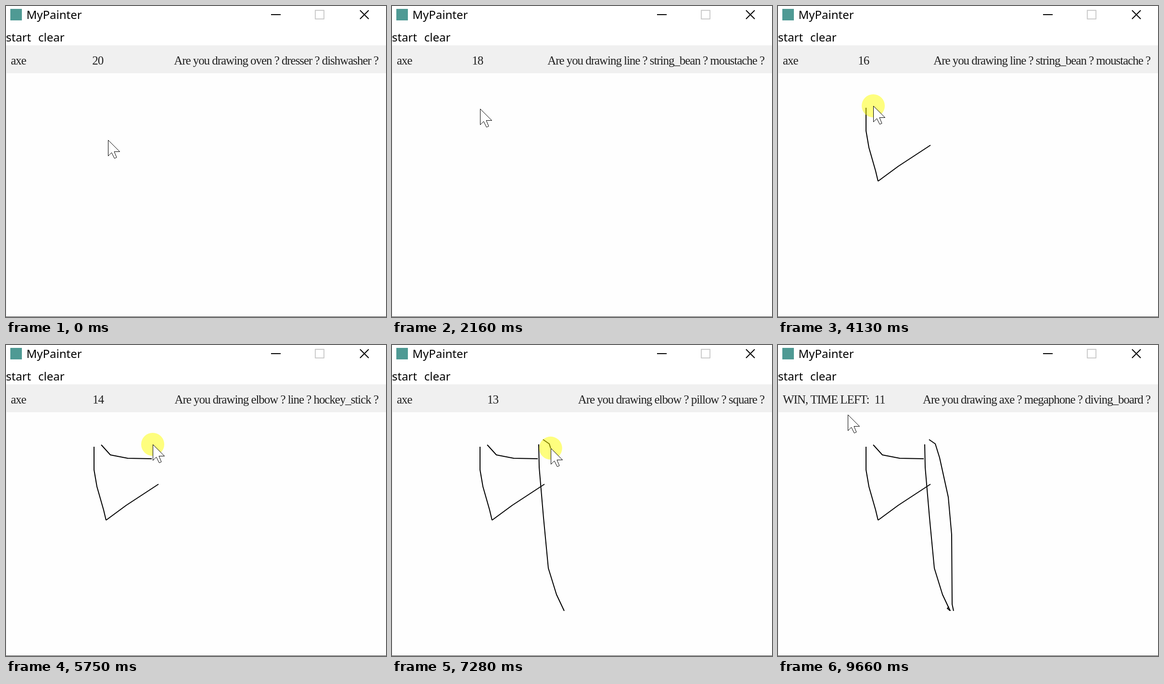
Animation, 790 px wide and 648 px high, one loop 9730 ms. Source, as an HTML page with a canvas:

```html
<!DOCTYPE html>
<html lang="en">
<head>
<meta charset="utf-8">
<title>MyPainter</title>
<style>
  html, body { margin: 0; width: 100%; height: 100%; overflow: hidden; background: #fff; }
  canvas { display: block; }
</style>
</head>
<body>
<canvas id="stage" width="790" height="648"></canvas>
<script>
const ctx = document.getElementById('stage').getContext('2d');
const LOOP = 9730;
const SANS = '24px "Noto Sans", sans-serif';
const SERIF = '25px "Liberation Serif", serif';
const ARROW = new Path2D('M0 0V33L7 26L13 38L17.5 36L12.5 24H24Z');

// Each stroke: button down, button up, and the corners of its line.
const strokes = [
  { press: 2240, release: 2870, points: [[183, 212], [183, 260], [189, 295], [203, 344], [208, 365]] },
  { press: 2940, release: 3650, points: [[208, 365], [250, 334], [317, 290]] },
  { press: 4130, release: 5140, points: [[198, 208], [217, 229], [253, 236], [303, 237]] },
  { press: 5750, release: 6510, points: [[305, 207], [306, 255], [315, 360], [325, 465], [342, 520], [358, 554]] },
  { press: 7050, release: 8280, points: [[314, 197], [327, 206], [336, 235], [354, 317], [361, 395], [362, 540], [365, 554]] },
  { press: 8430, release: 8740, points: [[355, 545], [352, 549], [358, 553], [355, 552]] }
];
const wander = [[212, 279], [152, 288], [195, 270], [152, 290], [183, 214]];
const exit = [145, 145];

// The guess shown from the given countdown value on.
const guesses = {
  20: ['oven', 'dresser', 'dishwasher'],
  18: ['line', 'string_bean', 'moustache'],
  15: ['line', 'string_bean', 'hockey_stick'],
  14: ['elbow', 'line', 'hockey_stick'],
  13: ['elbow', 'pillow', 'square'],
  11: ['axe', 'megaphone', 'toothpaste'],
  10: ['axe', 'megaphone', 'diving_board']
};
const WIN_AT = 11;

function ease(t, start, end) {
  const p = Math.min(1, Math.max(0, (t - start) / (end - start)));
  return p * p * (3 - 2 * p);
}

// The first part of a polyline, by share of its length.
function trace(points, share) {
  const lengths = points.slice(1).map(([x, y], i) => Math.hypot(x - points[i][0], y - points[i][1]));
  let left = share * lengths.reduce((a, b) => a + b, 0);
  const path = [points[0]];
  for (let i = 0; i < lengths.length && left > 0; i++) {
    const [x0, y0] = points[i], [x1, y1] = points[i + 1];
    const k = Math.min(1, left / lengths[i]);
    path.push([x0 + (x1 - x0) * k, y0 + (y1 - y0) * k]);
    left -= lengths[i];
  }
  return path;
}

// The hand rests briefly after pressing and before letting go.
const inked = ({ press, release, points }, t) => trace(points, ease(t, press + 70, release - 150));

function cursorAt(t) {
  const i = strokes.findLastIndex(s => s.press <= t);
  if (i < 0) return trace(wander, ease(t, 150, 2160)).pop();
  const stroke = strokes[i];
  if (t < stroke.release) return inked(stroke, t).pop();
  const next = strokes[i + 1] || { press: 9660, points: [exit] };
  return trace([stroke.points.at(-1), next.points[0]], ease(t, stroke.release, next.press)).pop();
}

function line(points) {
  ctx.beginPath();
  points.forEach(([x, y]) => ctx.lineTo(x, y));
  ctx.strokeStyle = '#000';
  ctx.lineWidth = 2;
  ctx.stroke();
}

function box(color, x, y, w, h) {
  ctx.fillStyle = color;
  ctx.fillRect(x, y, w, h);
}

function text(string, x, y, font, color, spacing) {
  ctx.font = font;
  ctx.letterSpacing = spacing + 'px';
  ctx.fillStyle = color;
  ctx.fillText(string, x, y);
}

function drawWindow() {
  const label = (string, x, y) => text(string, x, y, SANS, '#000', 0);
  box('#fff', 0, 0, 790, 648);
  box('#4f9a94', 9, 6, 24, 24);
  label('MyPainter', 42.5, 27);
  label('start', 0, 74);
  label('clear', 67, 74);
  line([[551, 18], [571, 18]]);
  line([[736, 9], [754, 27]]);
  line([[754, 9], [736, 27]]);
  ctx.strokeStyle = '#ccc';
  ctx.strokeRect(643, 9, 18, 18);
  box('#f0f0f0', 0, 82, 790, 58);
  box('#fefefe', 0, 140, 790, 507);
  box('#f0f0f0', 0, 140, 1, 507);
  box('#4a4a4a', 0, 647, 790, 1);
}

function drawStatus(t) {
  const label = (string, x) => text(string, x, 122, SERIF, '#222', -1.05);
  const countdown = 20 - Math.floor((t + 455) / 995);
  const won = countdown <= WIN_AT;
  const latest = Math.min(...Object.keys(guesses).filter(from => from >= countdown));
  const question = 'Are you drawing ' + guesses[latest].map(word => word + ' ?').join(' ');

  label(won ? 'WIN, TIME LEFT:' : 'axe', 10);
  const left = 774 - ctx.measureText(question).width;
  label(question, left);
  label(Math.max(countdown, WIN_AT), won ? 200.5 : left / 2 + 4.75);
}

function drawCursor(t) {
  const [x, y] = cursorAt(t);
  if (strokes.some(s => t >= s.press && t < s.release)) {
    ctx.fillStyle = 'rgba(255, 255, 0, 0.5)';
    ctx.beginPath();
    ctx.arc(x, y, 24, 0, 2 * Math.PI);
    ctx.fill();
  }
  ctx.save();
  ctx.translate(Math.round(x) + 0.5, Math.round(y) + 0.5);
  ctx.fillStyle = '#fff';
  ctx.fill(ARROW);
  ctx.strokeStyle = '#000';
  ctx.lineWidth = 1;
  ctx.stroke(ARROW);
  ctx.restore();
}

const began = performance.now();
function frame() {
  const t = (performance.now() - began) % LOOP;
  drawWindow();
  drawStatus(t);
  strokes.filter(s => s.press < t).forEach(s => line(inked(s, t)));
  drawCursor(t);
  requestAnimationFrame(frame);
}
ctx.lineJoin = 'round';
frame();
</script>
</body>
</html>
```
